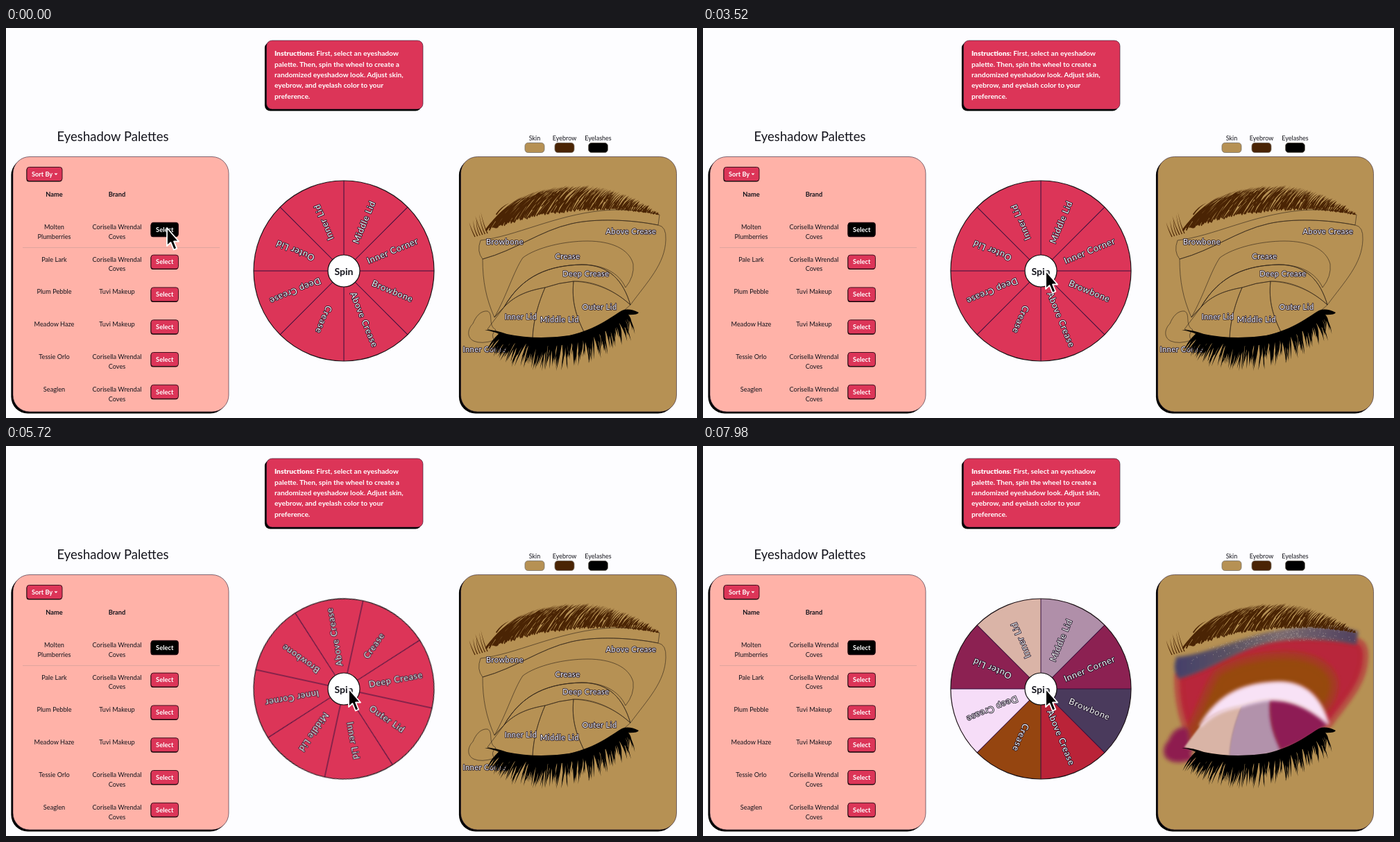
Recreate the animation shown at these times as an HTML page. Size 996 by 562 pixels, loop 8000 ms.

```html
<!DOCTYPE html>
<html lang="en">
<head>
<meta charset="utf-8">
<title>Eyeshadow wheel</title>
<style>
  html, body { margin: 0; width: 100%; height: 100%; overflow: hidden; background: #fdfdff; }
  svg { display: block; width: 100vw; height: 100vh; }
  text { font-family: Lato, "Open Sans", sans-serif; fill: #14141c; }
  .mid { text-anchor: middle; }
  .bold { font-weight: 700; }
  .white { fill: #fff; }
  .tag { fill: #fff; stroke: #1c1226; stroke-width: 1.6px; stroke-linejoin: round; paint-order: stroke; text-anchor: middle; }
  .line { fill: none; stroke: #2b2118; stroke-width: .6; }
</style>
</head>
<body>
<svg id="stage" viewBox="0 0 996 562" xmlns="http://www.w3.org/2000/svg"></svg>
<script>
const LOOP = 8000, SPIN_START = 4203, SPIN_END = 6182;
const PINK = '#dc3558', SKIN = '#b69154', BROW = '#4a2404';

let seed = 7;
const rand = () => (seed = seed * 16807 % 2147483647) / 2147483647;
const spread = amount => (rand() - .5) * 2 * amount;
const fix = n => n.toFixed(1);
const repeat = (count, make) => Array.from({ length: count }, (_, i) => make(i, i / (count - 1))).join('');

// Text placed by its vertical middle
const text = (x, y, size, words, cls = '', extra = '') =>
  `<text x="${x}" y="${y + size * .35}" font-size="${size}" class="${cls}" ${extra}>${words}</text>`;
const box = (x, y, w, h, r, fill, stroke = '#000', width = 1) =>
  `<rect x="${x}" y="${y}" width="${w}" height="${h}" rx="${r}" fill="${fill}" stroke="${stroke}" stroke-width="${width}"/>`;
const card = (x, y, w, h, r, fill, drop = 2.6) =>
  box(x - drop, y + drop, w, h, r, '#000', 'none') + box(x, y, w, h, r, fill, '#2a1a30', .6);
const button = (x, y, w, h, fill, words, size = 9.3) =>
  box(x - .5, y + 1, w, h, 3.5, '#000', 'none') + box(x, y, w, h, 3.5, fill, '#2a0a14', .9) +
  text(x + w / 2, y + h / 2, size, words, 'mid bold white');

function instructions() {
  const lines = ['<tspan font-weight="900">Instructions:</tspan> First, select an eyeshadow',
    'palette. Then, spin the wheel to create a', 'randomized eyeshadow look. Adjust skin,',
    'eyebrow, and eyelash color to your', 'preference.'];
  return card(375.5, 18, 225.5, 99, 8, PINK) +
    lines.map((words, i) => text(387, 36.7 + i * 15.4, 10.2, words, 'bold white')).join('');
}

function palettes() {
  const first = ['Corisella Wrendal', 'Coves'], second = ['Tuvi Makeup'];
  const rows = [[['Molten', 'Plumberries'], first], [['Pale Lark'], first], [['Plum Pebble'], second],
    [['Meadow Haze'], second], [['Tessie Orlo'], first], [['Seaglen'], first]];
  const cell = (x, y, lines) => lines.map((words, i) => text(x, y + i * 13.7, 9.2, words, 'mid')).join('');
  return text(154, 157, 18.5, 'Eyeshadow Palettes', 'mid') +
    card(10, 185.5, 311, 367.5, 24, '#ffb2a8') +
    button(30, 200.5, 51, 20, PINK, '') + text(37, 210.5, 9.2, 'Sort By', 'bold white') +
    '<path d="M69.5 209.5h5l-2.5 2.6z" fill="#fff"/>' +
    text(69.5, 239.7, 9.3, 'Name', 'mid bold') + text(160, 239.7, 9.3, 'Brand', 'mid bold') +
    '<path d="M24 316.5H308" stroke="#dfa49e"/>' +
    rows.map(([name, brand], i) => {
      const y = 286.6 + i * 46.8;
      return cell(69.5, y, name) + cell(160, y, brand) +
        button(209, y - 6.3, 39.5, 20, i ? PINK : '#000', 'Select');
    }).join('');
}

const slices = [['Middle Lid', '#b08fa9'], ['Inner Corner', '#8c2152'], ['Browbone', '#4a3a5c'],
  ['Above Crease', '#ba2338'], ['Crease', '#954510'], ['Deep Crease', '#f6ddf8'],
  ['Outer Lid', '#8c2152'], ['Inner Lid', '#dab4a7']];

function wheel() {
  const c = fix(130 * Math.SQRT1_2);
  const wedge = (fill, i) =>
    `<path d="M0 0V-130A130 130 0 0 1 ${c} -${c}Z" transform="rotate(${i * 45})" fill="${fill}"/>`;
  const spokes = slices.map((_, i) => `<path d="M0 0V-130" transform="rotate(${i * 45})"/>`).join('');
  const tags = slices.map(([name], i) =>
    `<g transform="rotate(${i * 45 - 67.5})">${text(76, 0, 12.7, name, 'tag', 'letter-spacing=".7"')}</g>`).join('');
  return `<g transform="translate(487 350)"><g id="wheel">
    <circle r="130" fill="${PINK}"/>
    <g class="made">${slices.map(([, fill], i) => wedge(fill, i)).join('')}</g>
    <g stroke="#35103c" stroke-width="1" fill="none">${spokes}</g>
    <circle r="130" fill="none" stroke="#1c1418" stroke-width="1.2"/>${tags}</g>
    <circle r="23" fill="#fff" stroke="#111" stroke-width="1.2"/>
    ${text(0, 1, 14, 'Spin', 'mid bold')}</g>`;
}

const area = {
  above: 'M687 333C735 320 770 292 815 282C850 274 900 276 940 284Q952 286 951 305C950 340 925 365 900 399C890 365 870 341 830 341C785 342 745 355 718 402L704 417C692 390 687 365 687 333Z',
  browbone: 'M684 306C735 300 790 270 860 263C895 260 925 264 942 269L940 284C900 276 850 274 815 282C770 292 735 320 687 333Q678 322 684 306Z',
  crease: 'M704 417C722 385 732 350 745 331C765 316 805 307 838 307C872 307 898 318 904 340Q906 358 893 374C883 352 860 341 830 341C785 342 745 355 718 402Z',
  deep: 'M718 402C745 355 785 342 830 341C870 341 890 365 900 399C870 372 840 364 818 365Q797 367 777 374C755 378 735 384 718 402Z',
  inner: 'M694 434L718 402C735 384 755 378 777 374C768 395 760 420 759 447Q725 445 694 434Z',
  middle: 'M777 374Q797 367 818 365C815 395 822 415 833 438Q795 450 759 447C760 420 768 395 777 374Z',
  outer: 'M818 365C850 366 880 380 900 399Q880 420 833 438C822 415 815 395 818 365Z',
  corner: 'M706 435C694 428 703 412 694 408C684 407 677 416 673 426C665 434 664 446 674 451Q685 456 704 450Q698 442 706 435Z'
};

const quad = (a, b, c, t) => (1 - t) ** 2 * a + 2 * t * (1 - t) * b + t * t * c;
const cubic = (a, b, c, d, t) => (1 - t) * quad(a, b, c, t) + t * quad(b, c, d, t);

// A curved hair that narrows from its root to its tip
function taper(x, y, cx, cy, tipX, tipY, w) {
  const len = Math.hypot(tipX - x, tipY - y) || 1;
  const nx = (y - tipY) / len * w, ny = (tipX - x) / len * w;
  return `M${fix(x + nx)} ${fix(y + ny)}Q${fix(cx + nx * .7)} ${fix(cy + ny * .7)} ${fix(tipX)} ${fix(tipY)}` +
    `Q${fix(cx - nx * .7)} ${fix(cy - ny * .7)} ${fix(x - nx)} ${fix(y - ny)}Z`;
}

function eyebrow() {
  const low = t => [quad(672, 810, 943, t), quad(301, 246, 270, t)];
  const high = t => [quad(684, 830, 943, t), quad(274, 184, 269, t)];
  const hair = (i, u) => {
    const t = .06 + u * .93, lift = i % 2 ? rand() * .6 : rand() * .1;
    const [ax, ay] = low(t), [hx, hy] = high(t + (1 - t) * (.08 + rand() * .12));
    const x = ax + (hx - ax) * lift * .7, y = ay + (hy - ay) * lift;
    const tipX = hx + spread(3), tipY = hy + spread(2);
    return taper(x, y, x + (tipX - x) * .4, y + (tipY - y) * .66, tipX, tipY, .95);
  };
  const stray = i => {
    const x = 676 + i * 3.6, y = 301 - i;
    return taper(x, y, x - 6, y - 12, x - 7 + spread(4), y - 21 - i * 2, .6);
  };
  return `<path fill="${BROW}" d="${repeat(200, hair)}${repeat(6, stray)}"/>`;
}

function lashes() {
  const lash = (i, u) => {
    const x = cubic(712, 760, 840, 893, u), y = cubic(441, 457, 450, 410, u);
    const angle = (128 - 62 * u + spread(9)) * Math.PI / 180;
    const length = (25 + 19 * Math.sin(Math.PI * (.12 + .76 * u))) * (.62 + rand() * .5);
    const dx = Math.cos(angle), dy = Math.sin(angle), bend = (u - .45) * 9 + spread(1.5);
    return taper(x, y, x + dx * length * .5 + dy * bend, y + dy * length * .5 - dx * bend,
      x + dx * length, y + dy * length, 1.6);
  };
  return `<path d="${repeat(165, lash)}"/>
    <path d="M690 435Q704 434 722 441Q765 450 812 443C852 434 872 416 888 407Q898 403 912 410Q910 414 894 413C875 436 835 455 790 458Q745 459 718 445Q705 437 690 435Z"/>`;
}

function makeup() {
  const soft = (key, fill, halo, blur) =>
    `<path d="${area[key]}" fill="${fill}" stroke="${fill}" stroke-opacity=".6" stroke-width="${halo}" stroke-linejoin="round" filter="url(#blur${blur})"/>`;
  const speck = () => {
    const x = 825 + (rand() + rand() + rand() - 1.5) * 92;
    const y = 272 + Math.max(0, 825 - x) * .29 + spread(9);
    return `M${fix(x)} ${fix(y)}h.9`;
  };
  return `<g class="made">
    ${soft('above', '#b8253a', 16, 2)}${soft('browbone', 'url(#shimmer)', 6, 2)}
    <path d="${repeat(240, speck)}" stroke="#c9bcb4" stroke-width=".9" opacity=".65"/>
    ${soft('crease', '#97490f', 22, 3)}${soft('corner', '#8e1f50', 8, 2)}
    ${soft('inner', '#d9b4a6', 1, 1)}${soft('middle', '#b292ab', 2, 1)}${soft('outer', '#8e1f55', 3, 2)}
    ${soft('deep', '#f8e2f6', 6, 2)}</g>`;
}

function face() {
  const swatches = [[762, 'Skin', SKIN], [805, 'Eyebrow', BROW], [853.5, 'Eyelashes', '#000']];
  const tags = [[719, 308, 'Browbone'], [901, 293, 'Above Crease'], [809.5, 329, 'Crease'],
    [836, 354, 'Deep Crease'], [742, 416, 'Inner Lid'], [798, 420, 'Middle Lid'],
    [855.5, 402, 'Outer Lid'], [692, 463, 'Inner Corner']];
  return swatches.map(([x, name, fill]) =>
      text(x, 158.5, 9, name, 'mid') + box(x - 14, 165.5, 28, 14, 4.5, fill, '#777066', .8)).join('') +
    card(655.5, 185.5, 311, 367.5, 24, SKIN) +
    makeup() +
    `<g class="plain">${Object.values(area).map(d => `<path class="line" d="${d}"/>`).join('')}</g>` +
    eyebrow() +
    `<g class="plain">${tags.map(([x, y, name]) => text(x, y, 11, name, 'tag', 'letter-spacing=".5"')).join('')}</g>` +
    lashes();
}

const blurs = [[1, .8], [2, 2], [3, 3]].map(([id, size]) =>
  `<filter id="blur${id}" x="-20%" y="-20%" width="140%" height="140%"><feGaussianBlur stdDeviation="${size}"/></filter>`).join('');

document.getElementById('stage').innerHTML = `<defs>${blurs}
  <linearGradient id="shimmer"><stop stop-color="#45406a"/><stop offset=".3" stop-color="#5b5262"/>
  <stop offset=".58" stop-color="#7b6c70"/><stop offset="1" stop-color="#50405f"/></linearGradient></defs>` +
  instructions() + palettes() + wheel() + face() +
  `<g id="cursor"><path d="M0 0V26L5.5 21L9.8 31.5L14.2 29.6L10 19.5H17Z" fill="#000" stroke="#fff" stroke-width="1.8" stroke-linejoin="round"/></g>`;

// steps: [time in ms, value, easing towards the next step]
function play(selector, property, steps) {
  const frames = steps.map(([time, value, easing = 'linear']) => ({ offset: time / LOOP, [property]: value, easing }));
  for (const el of document.querySelectorAll(selector)) {
    el.animate(frames, { duration: LOOP, iterations: Infinity });
  }
}
const at = (x, y) => `translate(${x}px, ${y}px)`;
const swap = (from, to) => [[0, from], [SPIN_END, from], [SPIN_END, to], [LOOP, to]];

play('#wheel', 'transform', [[0, 'rotate(0deg)'], [SPIN_START, 'rotate(0deg)'],
  [SPIN_END, 'rotate(720deg)'], [LOOP, 'rotate(720deg)']]);
play('.made', 'opacity', swap(0, 1));
play('.plain', 'opacity', swap(1, 0));
play('#cursor', 'transform', [[0, at(232, 288)], [500, at(232, 288), 'ease-in-out'], [1500, at(498, 361)],
  [1800, at(498, 361), 'ease-in-out'], [2400, at(494, 350)], [LOOP, at(494, 350)]]);
</script>
</body>
</html>
```
